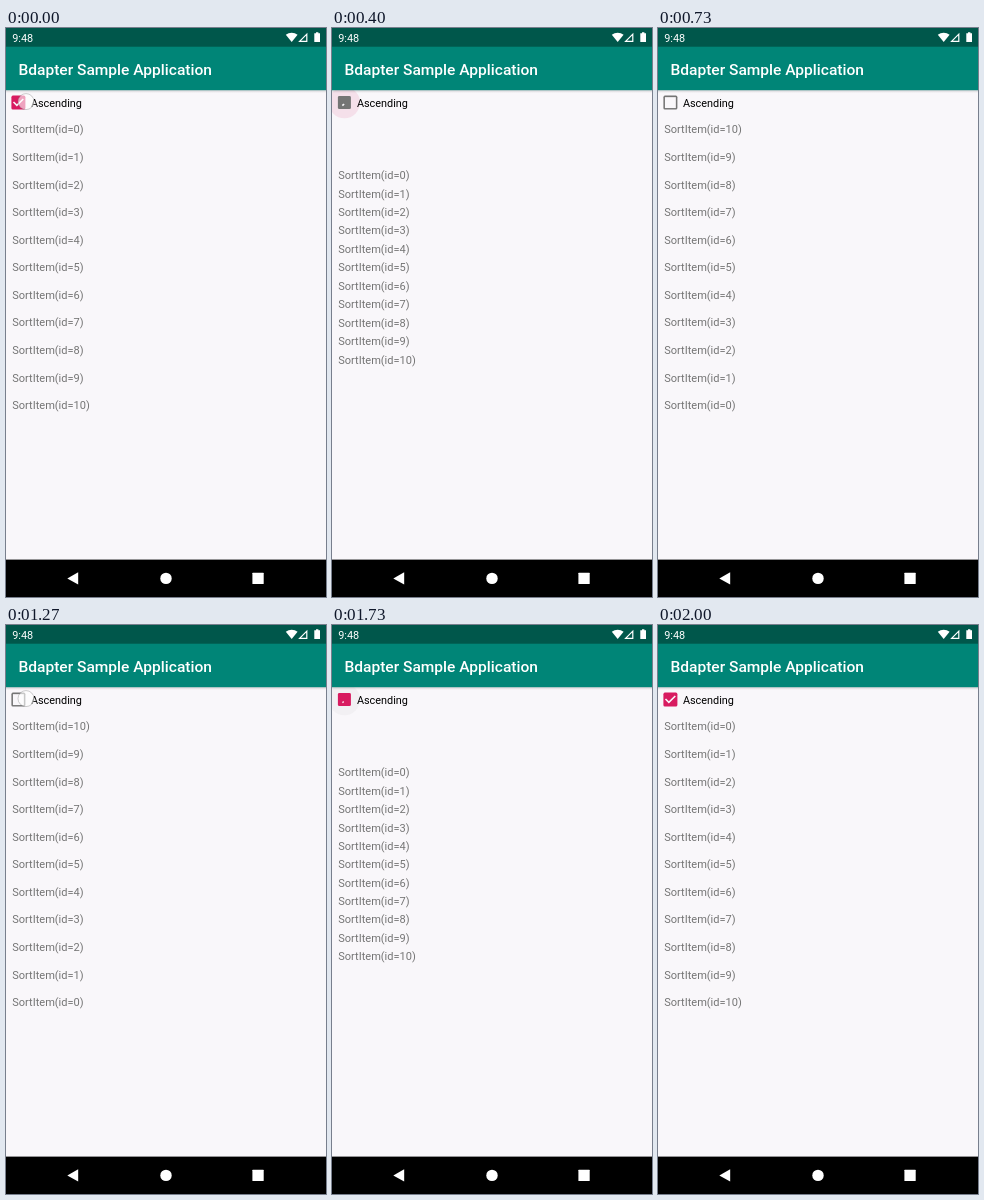
An HTML page for the animation above (2.07 s loop, 320 px wide and 569 px high).

```html
<!DOCTYPE html>
<html lang="en">
<head>
<meta charset="utf-8">
<title>Sorted list</title>
<style>
  html, body { margin: 0; width: 100%; height: 100%; overflow: hidden; background: #f9f7fa; }
  svg { display: block; width: 100%; height: 100%; font-family: Roboto, sans-serif; }
</style>
</head>
<body>
<svg viewBox="0 0 320 569">
  <defs>
    <linearGradient id="shade" x2="0" y2="1">
      <stop offset="0" stop-color="#000" stop-opacity=".16"/>
      <stop offset="1" stop-color="#000" stop-opacity="0"/>
    </linearGradient>
  </defs>
  <rect width="320" height="569" fill="#f9f7fa"/>

  <circle id="ripple" cx="12.4" cy="74.6"/>
  <g id="box">
    <rect id="frame" x="3" y="3" width="18" height="18" rx="2"/>
    <rect id="hole" fill="#f9f7fa"/>
    <path id="check" fill="none" stroke="#faf8fb" stroke-width="2"/>
  </g>
  <text x="24.9" y="79.2" font-size="10.89">Ascending</text>
  <circle id="touch" cx="20" cy="73.6" r="8" fill="#fff" fill-opacity=".6" stroke="#777" stroke-opacity=".45" stroke-width=".8"/>
  <g id="list" font-size="11.05" fill="#757575"></g>

  <rect y="62" width="320" height="3" fill="url(#shade)"/>
  <rect width="320" height="62.2" fill="#008577"/>
  <rect width="320" height="18.7" fill="#00574b"/>
  <g fill="#fff">
    <text x="6.2" y="13.6" font-size="10.9">9:48</text>
    <text x="12.4" y="46.7" font-size="15.56" font-weight="500">Bdapter Sample Application</text>
    <path d="M285.7 14 279.8 6.8A9.5 9.5 0 0 1 291.6 6.8Z"/>
    <path d="M300.8 6.2V13.4H293.6Z" fill="none" stroke="#fff" stroke-width="1.2"/>
    <path d="M308.3 5.3H310V4.3H312.4V5.3H314V14H308.3Z"/>
  </g>

  <rect y="531.6" width="320" height="37.4"/>
  <g fill="#fff">
    <path d="M61.3 550.4 72.2 544.2V556.6Z"/>
    <circle cx="160" cy="550.4" r="5.7"/>
    <rect x="246.4" y="544.8" width="11.3" height="11.3" rx=".5"/>
  </g>
</svg>
<script>
const LOOP = 2070, STEP = 200 / 3, SECOND_TAP = 19;
const PINK = [216, 27, 96], GREY = [117, 117, 117];
const ROWS = 11, PITCH = 27.57, MIDDLE = 243.3;

const byId = id => document.getElementById(id);
const clamp = x => Math.min(1, Math.max(0, x));
const easeOut = x => 1 - (1 - clamp(x)) ** 2;
const easeBoth = x => (1 - Math.cos(Math.PI * clamp(x))) / 2;
const mix = (a, b, p) => `rgb(${a.map((v, i) => Math.round(v + (b[i] - v) * p))})`;
const set = (el, attrs) => {
  for (const key in attrs) el.setAttribute(key, attrs[key]);
};

const rows = Array.from({ length: ROWS }, (_, id) => {
  const row = document.createElementNS("http://www.w3.org/2000/svg", "text");
  row.textContent = `SortItem(id=${id})`;
  set(row, { x: 6.2 });
  byId("list").append(row);
  return row;
});

function drawList(order) {
  rows.forEach((row, id) => set(row, { y: MIDDLE + (id - 5) * PITCH * order }));
}

// hole and tick run from 0 (closed) to 1 (full)
function drawBox(hole, tick, color, scale) {
  const size = 14 * hole, corner = 12 - size / 2;
  set(byId("box"), { transform: `translate(12.4 74.6) scale(${0.778 * scale}) translate(-12 -12)` });
  set(byId("frame"), { fill: color });
  set(byId("hole"), { x: corner, y: corner, width: size, height: size });
  const left = 4.3 * tick, right = 8.3 * tick;
  set(byId("check"), {
    d: tick > 0 ? `M${10 - left} ${15.6 - left}L10 15.6L${10 + right} ${15.6 - right}` : ""
  });
}

function drawTap(step, color) {
  const grow = easeOut((step - 0.5) / 3.5);
  const fade = clamp((8 - step) / 3);
  set(byId("ripple"), { r: 15.6 * grow, fill: color, "fill-opacity": 0.15 * fade });
  set(byId("touch"), { opacity: step < 6 ? 1 : 0 });
}

function draw(time) {
  const tick = Math.floor(time / STEP + 0.051);
  const turnOff = tick < SECOND_TAP;
  const step = turnOff ? tick : tick - SECOND_TAP;
  const age = (step - 4) * STEP;
  const [from, to] = turnOff ? [PINK, GREY] : [GREY, PINK];

  const moved = easeBoth((turnOff ? (step - 5) * STEP : 33 + (step - 5) * 75) / 250);
  drawList(turnOff ? 1 - 2 * moved : 2 * moved - 1);

  const hole = turnOff ? easeOut((age - 150) / 300) : clamp(1 - age / 133) ** 1.5;
  const check = turnOff ? clamp(1 - age / 166) : easeOut((age - 185) / 275);
  const dip = step < 5 ? 0 : clamp((10 - step) / 3);
  drawBox(hole, check, mix(from, to, clamp(age / 90)), 1 - 0.07 * dip);

  drawTap(step, mix(from, from, 0));
}

function loop() {
  draw(performance.now() % LOOP);
  requestAnimationFrame(loop);
}
loop();
</script>
</body>
</html>
```
